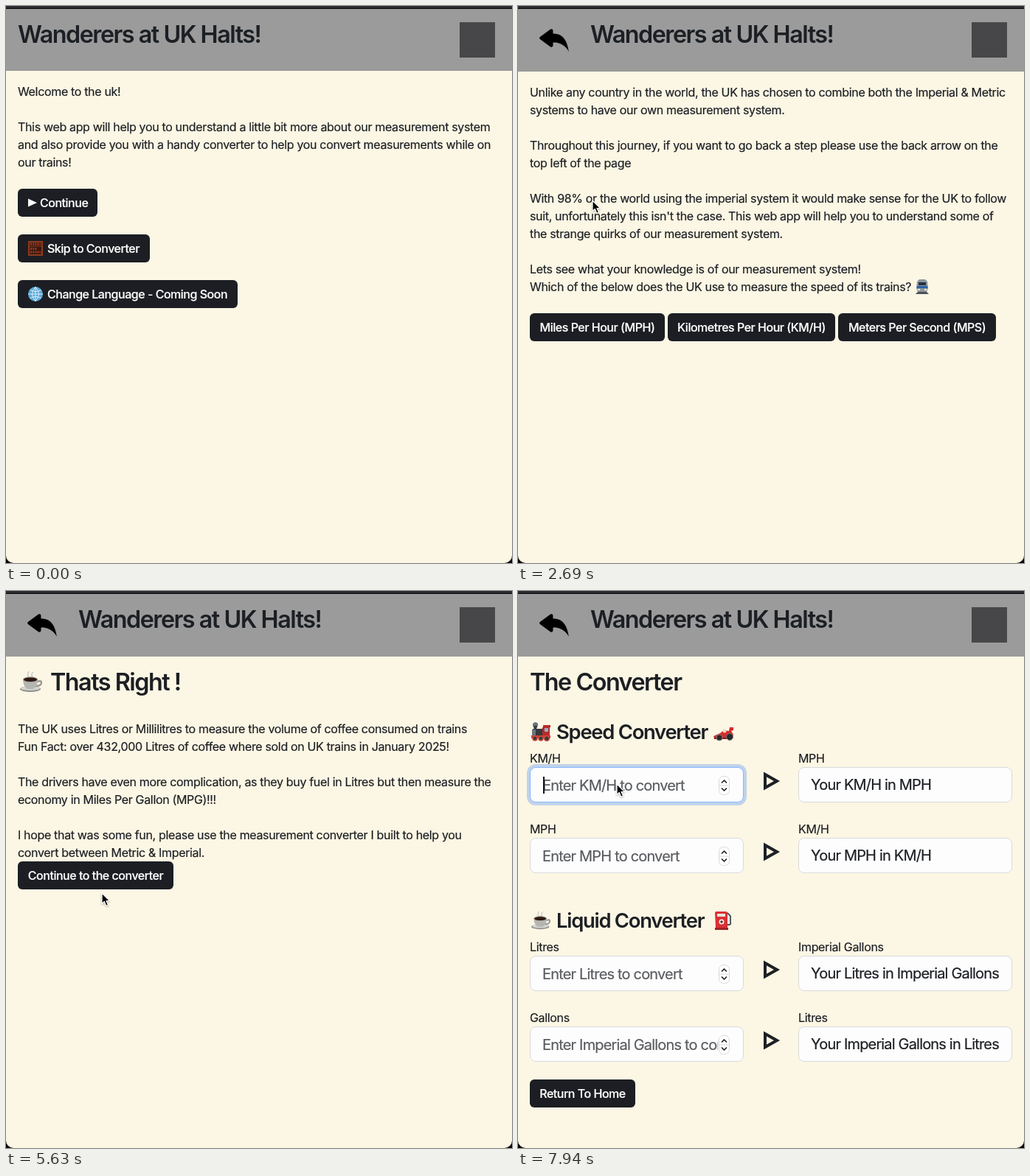
Recreate the animation shown at these times as an HTML page. Size 686 px wide and 756 px high, loop 8000 ms.

```html
<!DOCTYPE html>
<html lang="en">
<head>
<meta charset="utf-8">
<title>Rail converter walkthrough</title>
<style>
html, body { margin: 0; width: 100%; height: 100%; overflow: hidden; background: #000; }
#stage {
  position: absolute; width: 686px; height: 756px; overflow: hidden;
  border-radius: 0 0 10px 10px; background: #fcf6e4; color: #1c1f23;
  font: 16px/24px Inter, "Liberation Sans", sans-serif;
  font-optical-sizing: none; letter-spacing: -.021em; white-space: nowrap;
  -webkit-text-stroke: .2px;
}
#stage * { box-sizing: border-box; }
section, header, h1, h2, p, svg, .btn, .field, .mark, .bar, label { position: absolute; margin: 0; }
section { inset: 0; opacity: 0; animation: 8s step-end infinite; }
.bar { width: 100%; height: 4px; background: #2d2b30; border-bottom: 1px solid #09090a; }
header { top: 4px; width: 100%; height: 85px; background: #9b9b9b; }
#welcome header { height: 84px; }
header h1 { top: 16px; left: 98px; }
#welcome header h1 { left: 16px; }
.mark { left: 615px; top: 18px; width: 48px; height: 48px; background: #47474a; }
h1, h2 { font-weight: 600; line-height: 1.2; letter-spacing: -.046em; -webkit-text-stroke: 0; }
h1 { font-size: 32.3px; top: 105px; left: 16px; }
h2 { font-size: 27.4px; left: 52px; }
p, label { left: 16px; }
.btn {
  height: 38px; left: 16px; line-height: 38px; border-radius: 6px; text-align: center;
  background: #1c1e23; color: #fff; font-weight: 500; letter-spacing: -.03em;
  animation: 8s linear infinite;
}
.icon { text-align: left; padding-left: 40px; }
.field {
  width: 290px; height: 48px; padding: 0 16px; line-height: 47px; font-size: 20px;
  letter-spacing: -.041em; border: 1px solid #d7dadc; border-radius: 8px; background: #fdfdfe;
}
.field.in { left: 16px; color: #595c5f; line-height: 49px; }
.field.in span { display: block; width: 238px; overflow: hidden; }
.field.out, label.out { left: 380px; }
.field svg { right: 18px; top: 11px; }
#focus { animation: focus 8s step-end infinite; }
#focus i { position: absolute; left: 17px; top: 12px; width: 2px; height: 23px; background: #111;
  opacity: 0; animation: caret 8s step-end infinite; }

#welcome { animation-name: show1; }
#intro { animation-name: show2; }
#coffee { animation-name: show3; }
#right { animation-name: show4; }
#convert { animation-name: show5; }
@keyframes show1 { 0% { opacity: 1 } 31.25% { opacity: 0 } }
@keyframes show2 { 0% { opacity: 0 } 31.25% { opacity: 1 } 56.25% { opacity: 0 } }
@keyframes show3 { 0% { opacity: 0 } 56.25% { opacity: 1 } 66.25% { opacity: 0 } }
@keyframes show4 { 0% { opacity: 0 } 66.25% { opacity: 1 } 81.875% { opacity: 0 } }
@keyframes show5 { 0% { opacity: 0 } 81.875% { opacity: 1 } }

@keyframes hoverLang { 15.6%, 18.1% { background: #1c1e23 } 16.3% { background: #313439 } }
@keyframes hoverSkip { 16.7%, 19.5% { background: #1c1e23 } 17.6% { background: #373a3f } }
@keyframes hoverNext { 18.5% { background: #1c1e23 } 20.4%, 99% { background: #3e3f43 } }
@keyframes hoverMiles { 47.8% { background: #1c1e23 } 49.7%, 99% { background: #444448 } }
@keyframes hoverLitres { 61% { background: #1c1e23 } 62.9%, 99% { background: #444448 } }
@keyframes hoverGo { 73.3% { background: #1c1e23 } 75.2%, 99% { background: #444448 } }
@keyframes focus {
  0% { border-color: #d7dadc; box-shadow: none }
  98% { border-color: #86b7fe; box-shadow: 0 0 0 4px rgba(13,110,253,.25) }
}
@keyframes caret { 0% { opacity: 0 } 98% { opacity: 1 } }

#cursor { left: -3px; top: -4px; filter: drop-shadow(0 1px 1px rgba(0,0,0,.3)); animation: travel 8s infinite; }
#arrow { animation: arrow 8s step-end infinite; }
#hand { opacity: 0; animation: hand 8s step-end infinite; }
@keyframes travel {
  0%, 11% { transform: translate(-30px, 770px) }
  11.25% { transform: translate(2px, 748px); animation-timing-function: ease-out }
  20%, 42.5% { transform: translate(101px, 265px); animation-timing-function: ease-in-out }
  50%, 58.5% { transform: translate(143px, 437px); animation-timing-function: ease-in-out }
  63%, 72.5% { transform: translate(130px, 411px); animation-timing-function: ease-in-out }
  76%, 92.25% { transform: translate(130px, 387px); animation-timing-function: ease-in-out }
  97%, 100% { transform: translate(134px, 263px) }
}
@keyframes arrow {
  0% { opacity: 1 } 19% { opacity: 0 } 31.25% { opacity: 1 }
  51.5% { opacity: 0 } 56.25% { opacity: 1 } 62.5% { opacity: 0 } 66.25% { opacity: 1 }
  74.5% { opacity: 0 } 81.875% { opacity: 1 }
}
@keyframes hand {
  0% { opacity: 0 } 19% { opacity: 1 } 31.25% { opacity: 0 }
  51.5% { opacity: 1 } 56.25% { opacity: 0 } 62.5% { opacity: 1 } 66.25% { opacity: 0 }
  74.5% { opacity: 1 } 81.875% { opacity: 0 }
}
</style>
</head>
<body>
<svg width="0" height="0">
  <symbol id="abacus" viewBox="0 0 20 20">
    <path fill="#35190f" stroke="#8c3c1c" stroke-width="2" d="M1 1h18v18H1z"/>
    <path stroke="#8c3c1c" d="M1 7h18"/>
    <path stroke="#a8321f" stroke-width="3" stroke-dasharray="2 1.2" d="M3 4h14M3 10.5h9M3 15h14"/>
  </symbol>
  <symbol id="globe" viewBox="0 0 20 20">
    <circle cx="10" cy="10" r="10" fill="#5ba7d6"/>
    <path fill="none" stroke="#d9eefa" d="M10 0v20M0 10h20M2.5 4.5q7.5 4 15 0M2.5 15.5q7.5-4 15 0M10 .5Q1 10 10 19.5M10 .5q9 9.5 0 19"/>
  </symbol>
  <symbol id="train" viewBox="0 0 18 20">
    <path fill="#4b5057" d="M4 16h10l4 4H0z"/>
    <path fill="#8c959f" d="M5 0h8l3 3 1 9-2 5H3l-2-5 1-9z"/>
    <path fill="#24313e" d="M4 4h10v4H4z"/>
    <path fill="#2d61a6" d="M2 9h14l.5 3h-15z"/>
    <path fill="#f7edba" d="M3 13h3v2H3zm9 0h3v2h-3z"/>
  </symbol>
  <symbol id="cup" viewBox="0 0 30 30">
    <path fill="none" stroke="#c9c9c9" stroke-width="1.5" d="M12 9q-3-3 0-8M17 9q-3-4 1-7"/>
    <ellipse cx="14" cy="25" rx="14" ry="4" fill="#8f8f8c"/>
    <ellipse cx="14" cy="24" rx="13" ry="3" fill="#d4d4d1"/>
    <path fill="none" stroke="#999996" stroke-width="2.5" d="M23 15q7-2 6 2-1 4-8 4"/>
    <path fill="#b5b5b2" d="M4 12h20q0 9-6 13H10q-6-4-6-13"/>
    <ellipse cx="14" cy="12" rx="10" ry="3.5" fill="#8b8a86"/>
    <ellipse cx="14" cy="12.3" rx="9" ry="2.8" fill="#2f1a11"/>
  </symbol>
  <symbol id="loco" viewBox="0 0 28 26">
    <path fill="#343a40" d="M3 4h7l-2 5h11v10H3V9h2z"/>
    <path fill="#6b747c" d="M3 2q4-4 7 0v3H3zM2 10h5v8H2z"/>
    <path fill="#b72c28" d="M17 4h10v3h-1v12H16V7h1z"/>
    <path fill="#8fb3c4" d="M19 8h5v5h-5z"/>
    <path fill="#d63b32" d="M1 18h26v4H1z"/>
    <g fill="#343a40" stroke="#c94a3c" stroke-width="1.5"><circle cx="6" cy="22" r="3"/><circle cx="14" cy="22" r="3"/><circle cx="22" cy="22" r="3.3"/></g>
  </symbol>
  <symbol id="racer" viewBox="0 0 28 20">
    <path fill="#d52b2b" d="M0 13l9-4 5-4 7 1 1-5h5v4l-3 1 3 5-2 5H1z"/>
    <path fill="#8e1519" d="M1 15h24v2H1z"/>
    <circle cx="15" cy="6" r="2.5" fill="#f0d7c2"/>
    <g fill="#26282c" stroke="#777" stroke-width="1"><circle cx="8" cy="15" r="4"/><circle cx="22" cy="14" r="4.5"/></g>
  </symbol>
  <symbol id="pump" viewBox="0 0 24 26">
    <path fill="none" stroke="#454a50" stroke-width="1.8" d="M18 19h2q3 0 2-4V7l-4-4"/>
    <path fill="#da3034" d="M2 1h14q2 0 2 2v20H2L1 3z"/>
    <path fill="#e9e4dc" d="M4 4h11v4H4z"/>
    <circle cx="10" cy="15" r="3.5" fill="#f8ece5"/><circle cx="10" cy="15" r="1.7" fill="#5b2525"/>
    <path fill="#9c2328" d="M1 23h18v3H1z"/>
  </symbol>
  <symbol id="back" viewBox="0 0 16 16">
    <path d="M5.9 11.9 1.35 8.6a.72.72 0 0 1 0-1.2L5.9 4.1A.72.72 0 0 1 7 4.7V6c1.500 0 6 0 7 8-2.500-4.500-7-4-7-4v1.300c0 .56-.6.9-1.100.6z"/>
  </symbol>
  <symbol id="next" viewBox="0 0 26 28">
    <path fill="none" stroke="#1d2024" stroke-width="4" d="M5 5v18L21 14z"/>
  </symbol>
  <symbol id="spin" viewBox="0 0 15 26">
    <rect x=".5" y=".5" width="14" height="25" rx="6" fill="#fff" stroke="#d8d8da"/>
    <path stroke="#d8d8da" d="M1 13h13"/>
    <path fill="none" stroke="#222" stroke-width="1.7" stroke-linecap="round" stroke-linejoin="round" d="M4.500 9l3-3 3 3M4.500 17l3 3 3-3"/>
  </symbol>
</svg>

<div id="stage">
  <section id="welcome">
    <p style="top:104px">Welcome to the uk!<br><br>This web app will help you to understand a little bit more about our measurement system<br>and also provide you with a handy converter to help you convert measurements while on<br>our trains!</p>
    <div class="btn" style="top:248px;width:108px;padding-left:30px;text-align:left;animation-name:hoverNext"><svg style="left:14px;top:13px" width="12" height="12"><path fill="#fff" d="M0 .5 12 6 0 11.500z"/></svg>Continue</div>
    <div class="btn icon" style="top:310px;width:179px;animation-name:hoverSkip"><svg style="left:14px;top:9px" width="20" height="20"><use href="#abacus"/></svg>Skip to Converter</div>
    <div class="btn icon" style="top:372px;width:298px;animation-name:hoverLang"><svg style="left:14px;top:9px" width="20" height="20"><use href="#globe"/></svg>Change Language - Coming Soon</div>
  </section>

  <section id="intro">
    <p style="top:105px">Unlike any country in the world, the UK has chosen to combine both the Imperial &amp; Metric<br>systems to have our own measurement system.<br><br>Throughout this journey, if you want to go back a step please use the back arrow on the<br>top left of the page<br><br>With 98% or the world using the imperial system it would make sense for the UK to follow<br>suit, unfortunately this isn't the case. This web app will help you to understand some of<br>the strange quirks of our measurement system.<br><br>Lets see what your knowledge is of our measurement system!<br>Which of the below does the UK use to measure the speed of its trains?</p>
    <svg style="left:539px;top:371px" width="18" height="20"><use href="#train"/></svg>
    <div class="btn" style="top:417px;width:183px;animation-name:hoverMiles">Miles Per Hour (MPH)</div>
    <div class="btn" style="top:417px;left:203px;width:227px">Kilometres Per Hour (KM/H)</div>
    <div class="btn" style="top:417px;left:434px;width:214px">Meters Per Second (MPS)</div>
  </section>

  <section id="coffee">
    <svg style="left:20px;top:109px" width="27" height="30"><use href="#train"/></svg>
    <h1 style="left:60px">Thats Right !</h1>
    <p style="top:181px">The UK uses Miles Per Hour (MPH) to measure the speed of its trains<br>while most of the world uses Kilometres Per Hour (KM/H).<br><br>Trains are not the only thing we like to measure in our own way, as you will see from the<br>next question.<br><br>Which of the below does the UK use to measure the volume of coffee?</p>
    <div class="btn" style="top:397px;width:170px;animation-name:hoverLitres">Litres or Millilitres</div>
    <div class="btn" style="top:397px;left:190px;width:138px">Imperial Pints</div>
    <div class="btn" style="top:397px;left:332px;width:152px">Imperial Gallons</div>
  </section>

  <section id="right">
    <svg style="left:19px;top:108px" width="30" height="30"><use href="#cup"/></svg>
    <h1 style="left:60px">Thats Right !</h1>
    <p style="top:175px">The UK uses Litres or Millilitres to measure the volume of coffee consumed on trains<br>Fun Fact: over 432,000 Litres of coffee where sold on UK trains in January 2025!<br><br>The drivers have even more complication, as they buy fuel in Litres but then measure the<br>economy in Miles Per Gallon (MPG)!!!<br><br>I hope that was some fun, please use the measurement converter I built to help you<br>convert between Metric &amp; Imperial.</p>
    <div class="btn" style="top:367px;width:211px;animation-name:hoverGo">Continue to the converter</div>
  </section>

  <section id="convert">
    <h1>The Converter</h1>
    <svg style="left:17px;top:178px" width="28" height="26"><use href="#loco"/></svg>
    <h2 style="top:175px">Speed Converter</h2>
    <svg style="left:265px;top:184px" width="28" height="20"><use href="#racer"/></svg>
    <svg style="left:18px;top:434px" width="26" height="26"><use href="#cup"/></svg>
    <h2 style="top:431px">Liquid Converter</h2>
    <svg style="left:266px;top:434px" width="24" height="26"><use href="#pump"/></svg>
    <div class="btn" style="top:663px;width:143px">Return To Home</div>
  </section>

  <div class="bar"></div>
  <svg id="cursor" width="24" height="28" viewBox="-3 -3 24 28">
    <path id="arrow" fill="#000" stroke="#fff" stroke-width="1.200" stroke-linejoin="round" d="M0 0v14.500l3.300-3 2.500 5.700 2.700-1.200-2.500-5.500h4.500z"/>
    <path id="hand" fill="#fff" stroke="#000" stroke-width="1.100" stroke-linejoin="round" d="M-1.500 1q1-2 2.500 0l1.500 5q1.500-1 2.200.5 1.500-1 2.300.5 2-.7 2.500 1.500.7 3-.8 6l-.4 3H1.500Q0 14-3 10.500q.5-2 3 0zM3 10.500v4M5.200 10.500v4M7.300 10.500v4"/>
  </svg>
</div>

<script>
const pages = [...document.querySelectorAll("section")];
for (const page of pages) {
  const arrow = page.id === "welcome" ? "" :
    '<svg style="left:26px;top:14.5px" width="49" height="49"><use href="#back"/></svg>';
  page.insertAdjacentHTML("afterbegin",
    `<header>${arrow}<h1>Wanderers at UK Halts!</h1><div class="mark"></div></header>`);
}

const rows = [
  [215, "KM/H", "MPH", "KM/H", "MPH"],
  [311, "MPH", "KM/H", "MPH", "KM/H"],
  [471, "Litres", "Imperial Gallons", "Litres", "Imperial Gallons"],
  [567, "Gallons", "Litres", "Imperial Gallons", "Litres"],
];
rows.forEach(([top, from, to, unit, result], i) => {
  const box = `style="top:${top + 24}px"`;
  document.getElementById("convert").insertAdjacentHTML("beforeend", `
    <label style="top:${top}px">${from}</label>
    <label class="out" style="top:${top}px">${to}</label>
    <div class="field in" ${i ? "" : 'id="focus"'} ${box}><span>Enter ${unit} to convert</span>
      <svg width="15" height="26"><use href="#spin"/></svg>${i ? "" : "<i></i>"}</div>
    <svg style="left:330px;top:${top + 29}px" width="26" height="28"><use href="#next"/></svg>
    <div class="field out" ${box}>Your ${unit} in ${result}</div>`);
});
</script>
</body>
</html>
```
